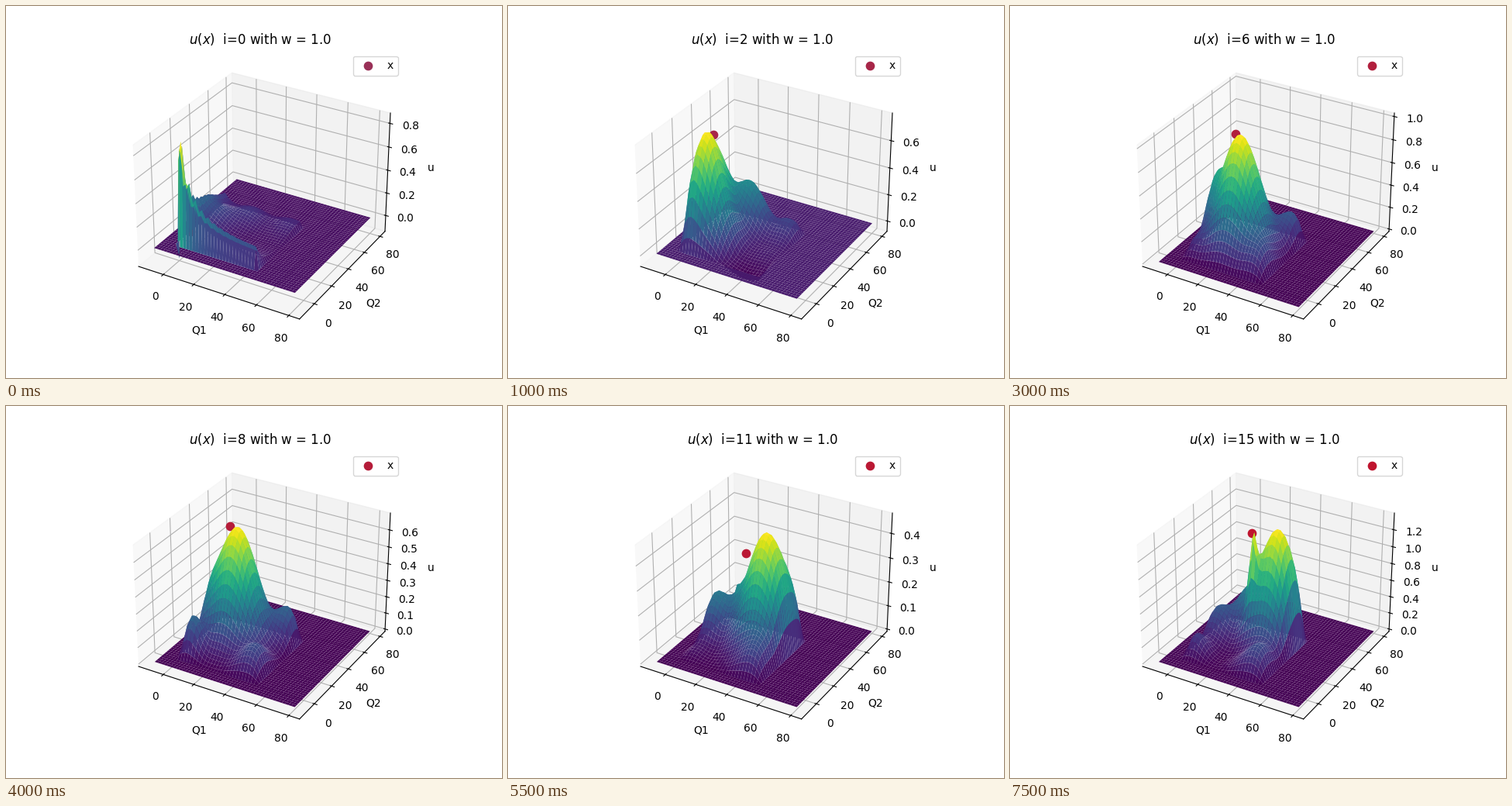
A matplotlib script for the animation above (8 s loop, 640x480 px).

```python
import numpy as np
import matplotlib.pyplot as plt
from matplotlib.animation import FuncAnimation

STEPS = 16
LO, HI = -10, 80
SIDE = 50  # the surface is non-zero on [0, SIDE]^2

axis = np.arange(LO, HI + 1, 2)
X, Y = np.meshgrid(axis, axis)
INSIDE = (X >= 0) & (X <= SIDE) & (Y >= 0) & (Y <= SIDE)

# Key points, interpolated over the steps.
KEYS = [0, 2, 4, 8, 10, 13, 15]
TOP = [.866, .781, 1.334, .684, .455, .506, 1.365]
PEAK_X = [1, 7, 28, 20, 33, 43, 38]
PEAK_Y = [0, 17, 16, 31, 34, 31, 38]
PEAK_W = [3, 10, 12, 11, 13, 9, 10]
DOT_X = [4, 12, 27, 15.6, 21.5, 28, 28]
DOT_Y = [6, 17, 15.6, 31, 33, 31, 29]
DOT_H = [.1, 1, 1, 1, .86, .65, 1]


def at(i, *tracks):
    return [np.interp(i, KEYS, t) for t in tracks]


def dome(x, y, width, height=1):
    return height * np.exp(-((X - x) ** 2 + (Y - y) ** 2) / (2 * width ** 2))


def cusp(x, y, width, height):
    return height * np.exp(-np.hypot(X - x, Y - y) / width)


def rim():
    """Sharp crest along the two near edges, jagged at the corner."""
    front = .5 * np.exp(-Y / 6) * (np.exp(-X / 20) + .5)
    left = .6 * np.exp(-X / 6 - Y / 40)
    jag = 1 + .25 * np.cos(np.pi / 2 * (X + Y)) * np.exp(-(X + Y) / 12)
    return (front + left) * jag


def surface(i):
    top, = at(i, TOP)
    low = np.interp(i, [0, 4], [-.122, 0])
    rise = min(i / 2, 1)
    pulse = 1 + .7 * np.cos(np.pi * (i - 2) / 3)
    parts = [
        dome(*at(i, PEAK_X, PEAK_Y, PEAK_W)),
        cusp(*at(i - 2, DOT_X, DOT_Y), 4, .075 * i * np.cos(np.pi * i / 5) ** 4),
        dome(5, 30, 9, (.75 - .03 * i) * (.3 + .7 * rise)),
        dome(20, 42, 9, .15 + .3 * rise),
        dome(45, 46, 9, .1 + .033 * i),
        dome(4, 8, 6, .3 * pulse * (1 - i / 30)),
        dome(44, 10, 9, .25 * min(i / 4, 1)),
        rim() * (1 - rise),
    ]
    u = np.sqrt(sum(p ** 2 for p in parts))
    for gap in (X, Y, SIDE - X, SIDE - Y):
        u *= 1 - .5 * rise * np.exp(-np.maximum(gap, 0) / 2)
    u -= dome(21 * i, 2 * i, .8 + 4 * i, 2 / (1 + 3 * i))
    u = np.where(INSIDE, u, 0)
    below = low / min(u.min(), -1e-9)
    return np.where(u > 0, u * top / u.max(), u * below)


def dot(i):
    x, y, h, top = at(i, DOT_X, DOT_Y, DOT_H, TOP)
    t = np.sqrt(i / (STEPS - 1))
    return (x, y, h * top), (.60 + .15 * t, .19 - .11 * t, .34 - .16 * t)


def padded(low, high, margin):
    pad = (high - low) * margin
    return low - pad, high + pad


fig = plt.figure(figsize=(6.4, 4.8), dpi=100)
ax = fig.add_subplot(projection='3d', computed_zorder=False)
SPAN = padded(*padded(LO, HI, .05), 1 / 48)


def draw(i):
    u = surface(i)
    place, colour = dot(i)
    ax.clear()
    ax.scatter(*[[v] for v in place], s=55, color=[colour], label='x',
               depthshade=False, zorder=1)
    ax.plot_surface(X, Y, u, cmap='viridis', zorder=2)
    ax.set_xlim(*SPAN)
    ax.set_ylim(*SPAN)
    ax.set_zlim(*padded(u.min(), u.max(), 1 / 48))
    ax.set_xlabel('Q1')
    ax.set_ylabel('Q2')
    ax.set_zlabel('u')
    ax.set_title(f'$u(x)$  i={i} with w = 1.0')
    ax.legend(loc='upper right')
    return []


anim = FuncAnimation(fig, draw, frames=STEPS, interval=500, repeat=True)
plt.show()
```
